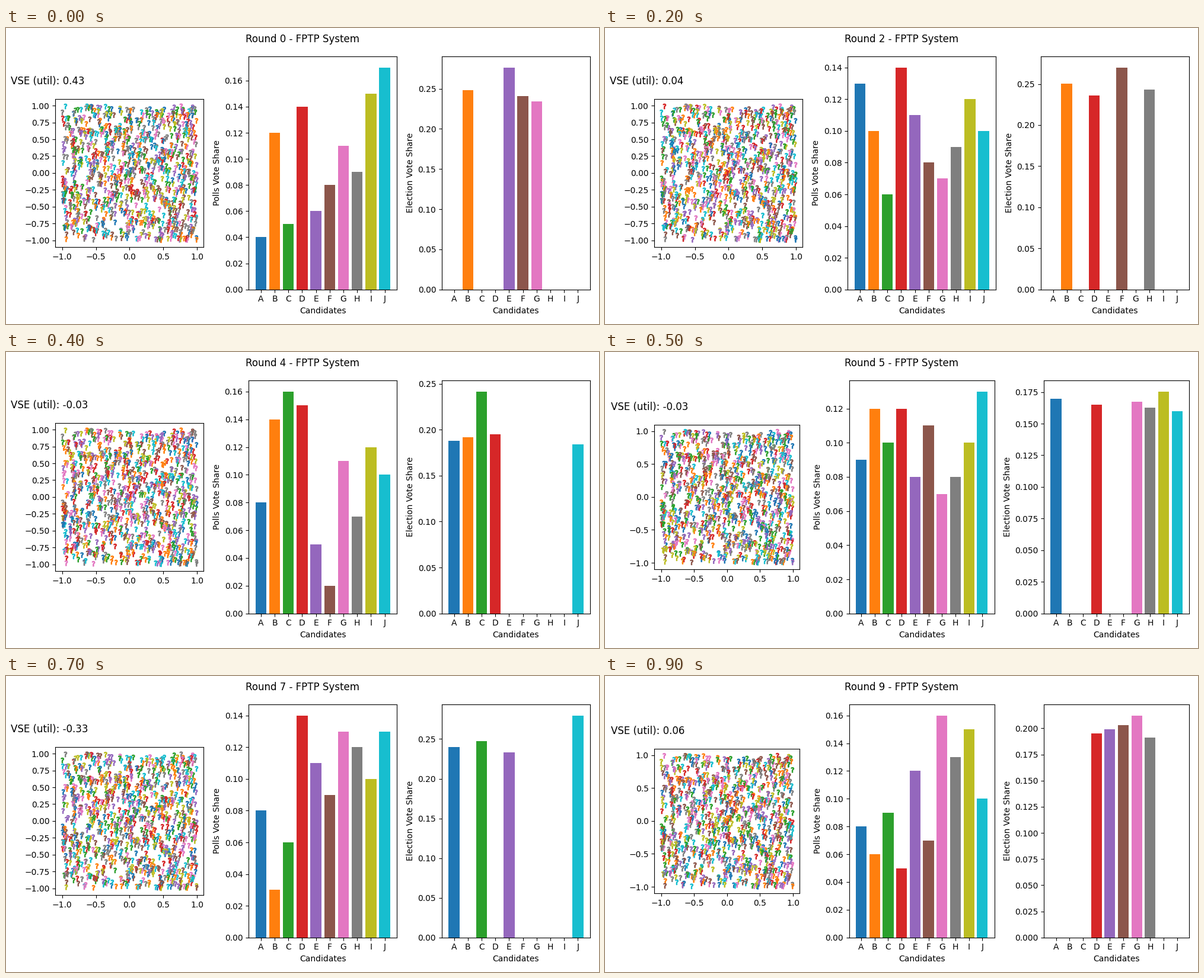
A matplotlib script for the animation above (1000 ms loop, 1000 by 500 pixels).

```python
import matplotlib.pyplot as plt
import numpy as np
from matplotlib.animation import FuncAnimation

NAMES = "ABCDEFGHIJ"
COLORS = np.array([f"C{i}" for i in range(10)])
VOTERS = np.random.default_rng(4).uniform(-1, 1, (1000, 2))

# VSE, poll ranking (worst to best), lowest and highest poll in percent,
# finalists (winner first), winning share
ROUNDS = [
    (0.43, "ACEFHGBDIJ", 4, 17, "EBFG", .2765),
    (0.21, "HBJDAFCIGE", 5, 15, "ECGA", .2660),
    (0.04, "CGFHJBEIAD", 6, 14, "FBHD", .2700),
    (0.33, "GJEICHDABF", 5, 13, "GAIDB", .2085),
    (-0.03, "FEHAJGIBDC", 2, 16, "CDBAJ", .2415),
    (-0.03, "GHEACIFBDJ", 7, 13, "IAGDHJ", .1754),
    (0.17, "DIAGJCHEBF", 4, 15, "BFHC", .2690),
    (-0.33, "BCAFIEHJGD", 3, 14, "JCAE", .2796),
    (0.12, "EJFCBHDGAI", 5, 14, "AIDG", .2720),
    (0.06, "DBFACJEHIG", 5, 16, "GFEDH", .2123),
]


def poll_shares(ranking, low, high):
    """Climb from low to high, bent so that the average poll is 10 percent."""
    bend = (high - low) / (10 - low) - 1
    climb = np.linspace(0, 1, 10) ** bend
    percent = np.round(low + (high - low) * climb)
    return dict(zip(ranking, percent / 100))


def vote_shares(finalists, win):
    """The runners-up split what the winner leaves almost evenly."""
    rest = len(finalists) - 1
    tail = (1 - win) / rest * np.linspace(1.03, 0.97, rest)
    return dict(zip(finalists, [win, *tail]))


def draw_bars(ax, shares, label):
    ax.clear()
    ax.bar(list(NAMES), [shares.get(c, 0) for c in NAMES], color=COLORS)
    ax.set(xlabel="Candidates", ylabel=label)


def draw_voters(ax, n, vse):
    ax.clear()
    picks = np.random.default_rng(100 + n).integers(0, 10, len(VOTERS))
    ax.scatter(*VOTERS.T, c=COLORS[picks], marker="$?$")
    ax.set(xlim=(-1.1, 1.1), ylim=(-1.1, 1.1), aspect="equal")
    ax.text(-0.3, 1.1, f"VSE (util): {vse:.2f}", fontsize=12,
            transform=ax.transAxes)


def update(n):
    vse, ranking, low, high, finalists, win = ROUNDS[n]
    title.set_text(f"Round {n} - FPTP System")
    draw_voters(ax_map, n, vse)
    draw_bars(ax_polls, poll_shares(ranking, low, high), "Polls Vote Share")
    draw_bars(ax_votes, vote_shares(finalists, win), "Election Vote Share")

    # start from the default margins so each layout is independent
    fig.subplots_adjust(left=0.125, right=0.9, bottom=0.11, top=0.88,
                        wspace=0.2, hspace=0.2)
    fig.tight_layout()
    return []


fig, (ax_map, ax_polls, ax_votes) = plt.subplots(1, 3, figsize=(10, 5), dpi=100)
title = fig.suptitle("")

anim = FuncAnimation(fig, update, frames=len(ROUNDS), interval=100,
                     init_func=lambda: update(0), repeat=True,
                     repeat_delay=0, blit=False)
plt.show()
```
